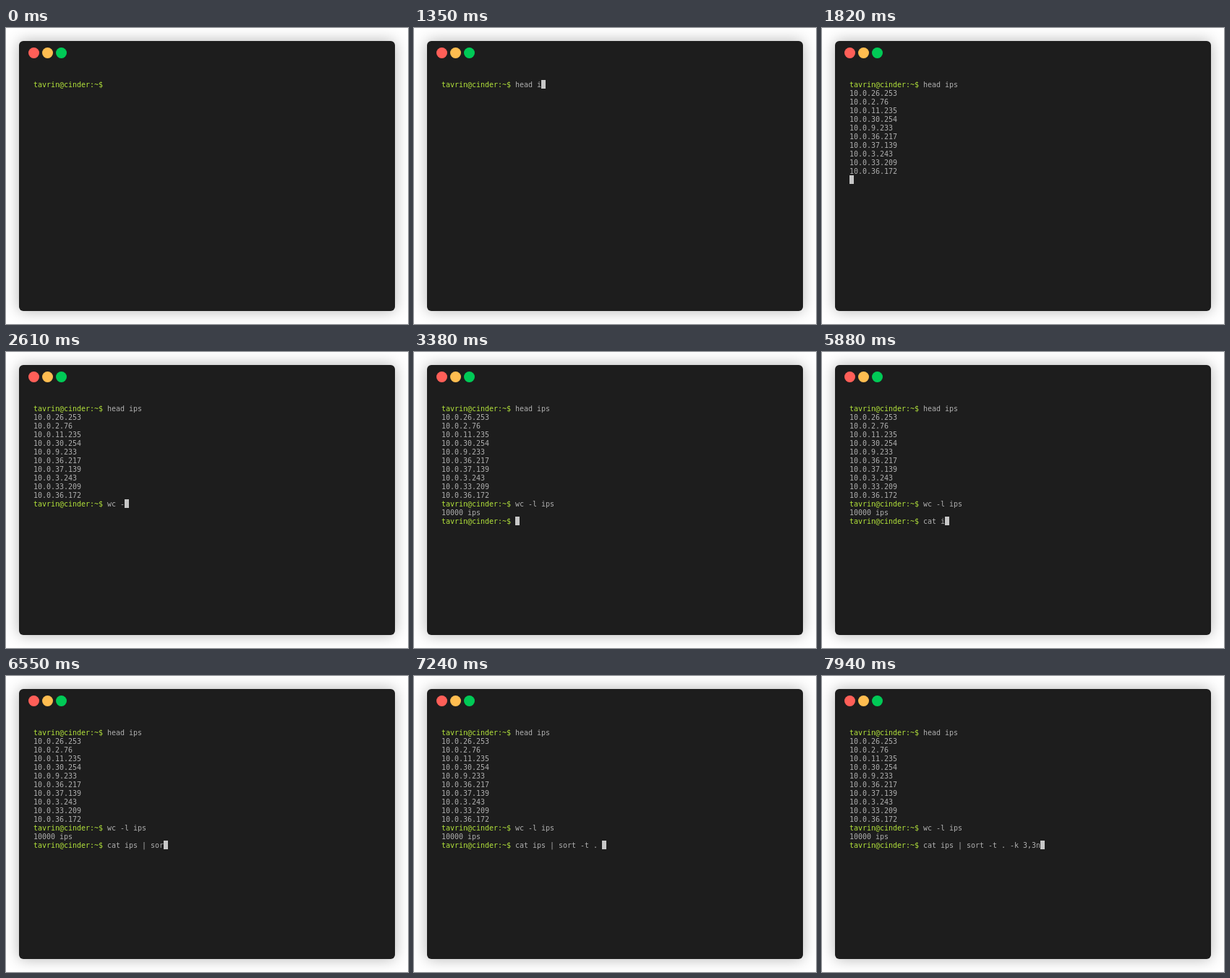
An HTML page with a canvas that plays this animation: 556x410 px, repeating every 8 s.

```html
<!DOCTYPE html>
<html lang="en">
<head>
<meta charset="utf-8">
<title>Terminal session</title>
<style>
  html, body { margin: 0; width: 100%; height: 100%; overflow: hidden; background: #fff; }
  canvas { display: block; width: 556px; height: 410px; }
</style>
</head>
<body>
<canvas id="stage"></canvas>
<script>
const W = 556, H = 410, LOOP = 8000;
const LEFT = 38, TOP = 72, CELL = 6, LINE = 12;
const GREEN = '#b3e33b', GREY = '#afafaf', CURSOR = '#c7c7c7';
const PROMPT = 'tavrin@cinder:~$ ';
const HOSTS = ['26.253', '2.76', '11.235', '30.254', '9.233',
               '36.217', '37.139', '3.243', '33.209', '36.172'];

const canvas = document.getElementById('stage');
const ctx = canvas.getContext('2d');
const ratio = window.devicePixelRatio || 1;
canvas.width = W * ratio;
canvas.height = H * ratio;
ctx.scale(ratio, ratio);

// Each event is a moment and the edit it makes to the screen.
const events = [];
const at = (time, edit) => events.push({ time, edit });
const last = s => s.lines[s.lines.length - 1];
const put = text => s => { last(s).text += text; };
const erase = s => { last(s).text = last(s).text.slice(0, -1); };
const newLine = s => s.lines.push({ prompt: false, text: '' });
const showPrompt = s => { last(s).prompt = true; };
const print = rows => s => rows.forEach(row => { put(row)(s); newLine(s); });

function type(text, start, end) {
  const gap = text.length > 1 ? (end - start) / (text.length - 1) : 0;
  [...text].forEach((c, i) => at(start + i * gap, put(c)));
}

function run(start, rows) {
  at(start, newLine);
  at(start + 100, print(rows));
  at(start + 200, showPrompt);
}

at(1000, s => { s.cursor = true; });
['h', 'e', 'ad', ' ', 'i', 'p', 's'].forEach((c, i) =>
  at([1000, 1090, 1170, 1260, 1350, 1450, 1550][i], put(c)));
run(1720, HOSTS.map(h => '10.0.' + h));
type('wc -', 2320, 2610);
type('l ips', 2710, 3080);
run(3180, ['10000 ips']);
type('ufw', 3980, 4180);
[5180, 5270, 5360].forEach(time => at(time, erase));
type('cat ips', 5450, 5980);
type(' | sor', 6050, 6550);
type('t -', 6650, 6840);
type('t . -k 3,3n', 6940, 7940);

function screenAt(time) {
  const screen = { lines: [{ prompt: true, text: '' }], cursor: false };
  for (const e of events) if (e.time <= time + 0.5) e.edit(screen);
  return screen;
}

function drawWindow() {
  ctx.fillStyle = '#fff';
  ctx.fillRect(0, 0, W, H);
  ctx.save();
  ctx.shadowColor = 'rgba(0, 0, 0, 0.3)';
  ctx.shadowBlur = 20 * ratio;
  ctx.fillStyle = '#1d1d1d';
  ctx.beginPath();
  ctx.roundRect(18, 18, 520, 374, 6);
  ctx.fill();
  ctx.restore();
  ['#ff5f58', '#ffbd50', '#00ca56'].forEach((color, i) => {
    ctx.fillStyle = color;
    ctx.beginPath();
    ctx.arc(38.5 + i * 19, 34.5, 7.5, 0, Math.PI * 2);
    ctx.fill();
  });
}

function drawText(text, col, row, color) {
  ctx.fillStyle = color;
  [...text].forEach((c, i) =>
    ctx.fillText(c, LEFT + (col + i) * CELL, TOP + row * LINE + 10));
}

function draw(time) {
  const { lines, cursor } = screenAt(time);
  drawWindow();
  ctx.font = '10px "DejaVu Sans Mono", "Noto Sans Mono", monospace';
  lines.forEach(({ prompt, text }, row) => {
    const col = prompt ? PROMPT.length : 0;
    if (prompt) drawText(PROMPT, 0, row, GREEN);
    drawText(text, col, row, GREY);
    if (cursor && row === lines.length - 1) {
      ctx.fillStyle = CURSOR;
      ctx.fillRect(LEFT + (col + text.length) * CELL, TOP + row * LINE, CELL, LINE);
    }
  });
}

const begin = performance.now();
function tick() {
  draw((performance.now() - begin) % LOOP);
  requestAnimationFrame(tick);
}
tick();
</script>
</body>
</html>
```
